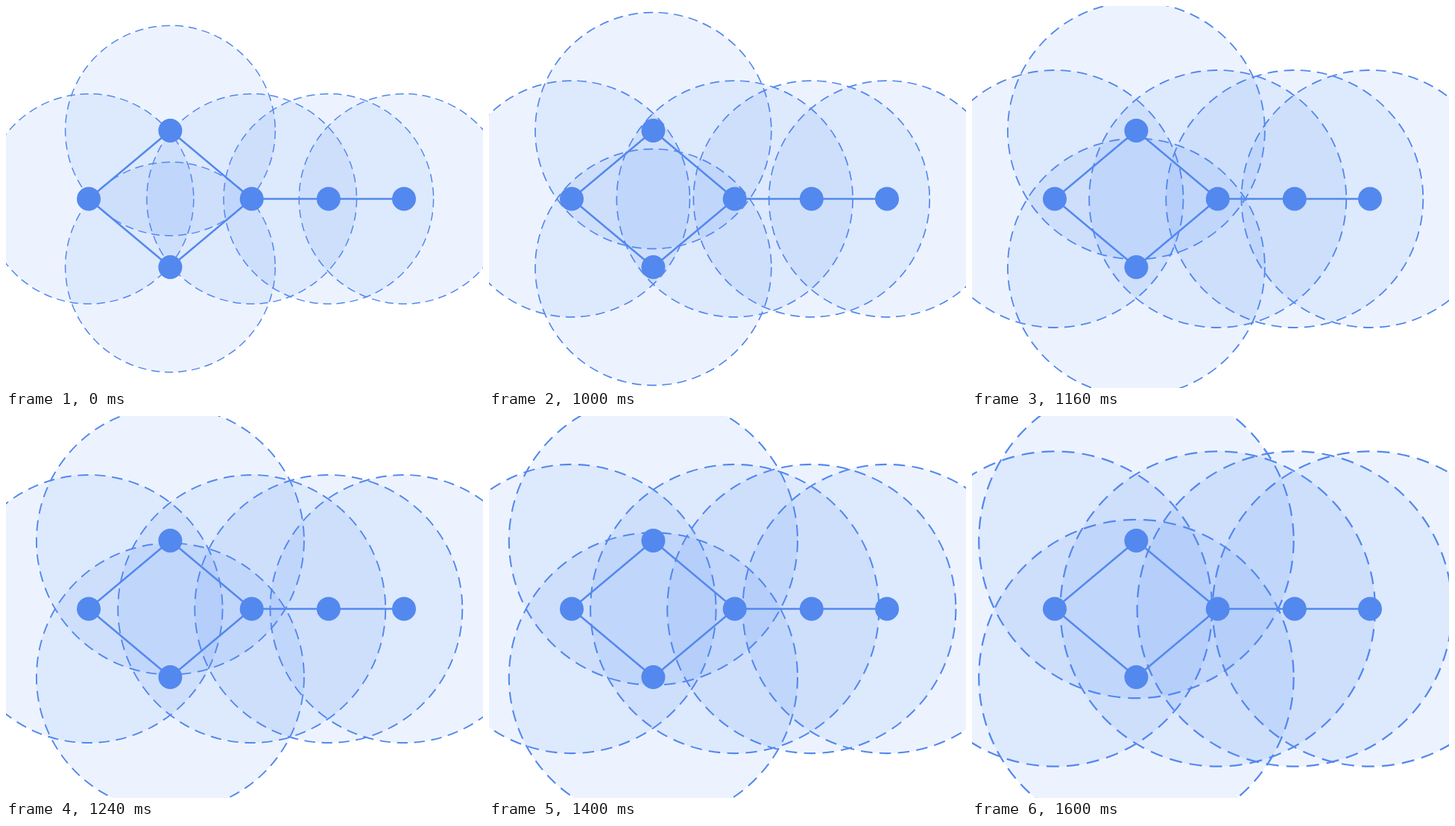
Write an HTML page with a canvas that moves like this. It is 640 px wide and 512 px high and loops after 2 s.

```html
<!DOCTYPE html>
<html lang="en">
<head>
<meta charset="utf-8">
<title>Growing radio ranges</title>
<style>
  html, body { margin: 0; width: 100%; height: 100%; overflow: hidden; background: #fff; }
  canvas { display: block; }
</style>
</head>
<body>
<canvas id="stage" width="640" height="512"></canvas>
<script>
const ctx = document.getElementById('stage').getContext('2d');
const BLUE = '#5388ee';
const LOOP = 2000, STEP = 40, GROW_START = 800, GROW_TIME = 800;
const RANGE = 140.8, NODE = 16;
const nodes = [[111, 258.5], [220.4, 167], [329.7, 258.5], [220.4, 350], [432.8, 258.5], [534, 258.5]];
const links = [[0, 1], [1, 2], [2, 3], [3, 0], [2, 4], [4, 5]];

function circle([x, y], radius) {
  ctx.beginPath();
  ctx.arc(x, y, radius, 0, 2 * Math.PI);
}

function draw(time) {
  const t = Math.floor((time % LOOP) / STEP) * STEP;
  const grown = Math.min(1, Math.max(0, (t - GROW_START) / GROW_TIME));
  const scale = 1 + grown / 2;

  ctx.clearRect(0, 0, 640, 512);
  ctx.fillStyle = ctx.strokeStyle = BLUE;

  // Ranges: stroke and dashes grow along with the radius
  ctx.lineWidth = 1.5 * scale;
  ctx.setLineDash([11.3 * scale, 6.8 * scale]);
  for (const node of nodes) {
    circle(node, RANGE * scale);
    ctx.globalAlpha = 0.1;
    ctx.fill();
    ctx.globalAlpha = 1;
    ctx.stroke();
  }

  ctx.lineWidth = 2.5;
  ctx.setLineDash([]);
  for (const [a, b] of links) {
    ctx.beginPath();
    ctx.moveTo(...nodes[a]);
    ctx.lineTo(...nodes[b]);
    ctx.stroke();
  }
  for (const node of nodes) {
    circle(node, NODE);
    ctx.fill();
  }
}

const start = performance.now();
function tick() {
  draw(performance.now() - start);
  requestAnimationFrame(tick);
}
tick();
</script>
</body>
</html>
```
